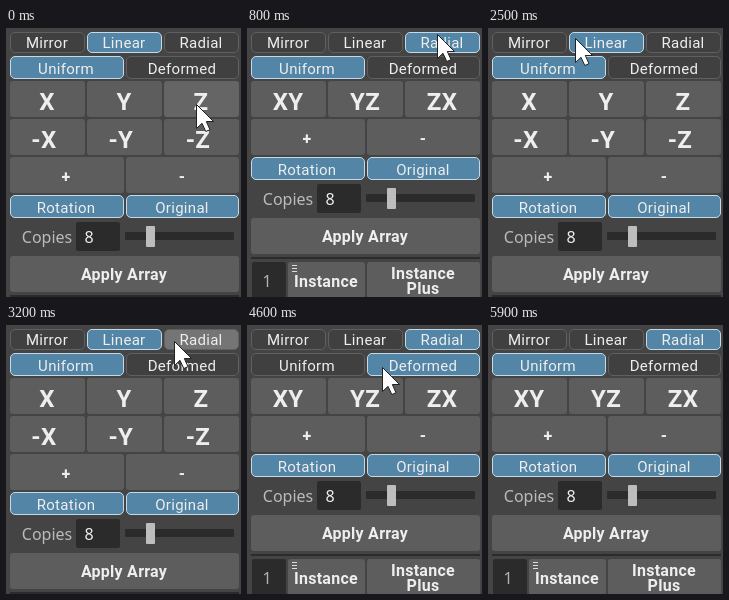
Recreate the animation shown at these times as an HTML page. Size 235 by 269 pixels, loop 6.4 s.

```html
<!DOCTYPE html>
<html>
<head>
<meta charset="utf-8">
<style>
html, body { margin: 0; width: 100%; height: 100%; overflow: hidden; background: #444; }
svg { display: block; }
text { font: 15px Roboto, sans-serif; letter-spacing: .3px; text-anchor: middle; fill: #eee; }
.bold { font-weight: 700; font-size: 16px; letter-spacing: .25px; }
.big { font-weight: 700; font-size: 24px; }
.label, .value { font: 16px "Noto Sans", sans-serif; letter-spacing: 0; }
.label { fill: #bbb; }
.dim { fill: #aab4bc; }
</style>
</head>
<body>
<svg id="stage" width="235" height="269" viewBox="0 0 235 269"></svg>
<script>
const stage = document.getElementById('stage');
const LOOP = 6400, STEP = 100;

// Pointer moves: start, end, target x, y
const moves = [
  [0, 300, 190, 2], [500, 800, 190, 6], [1300, 1900, 140, 9], [2200, 2700, 74, 10],
  [3000, 3300, 182, 17], [3800, 4000, 152, 20], [4000, 4300, 135, 42],
  [4700, 5400, 86, 47], [5400, 5900, 105, 275]
];
const easeOut = k => Math.sin(k * Math.PI / 2);

function pointer(t) {
  let x = 190, y = 76;
  for (const [start, end, toX, toY] of moves) {
    const k = easeOut(Math.min(1, Math.max(0, (t - start) / (end - start))));
    x += (toX - x) * k;
    y += (toY - y) * k;
  }
  return [Math.round(x), Math.round(y)];
}

const rect = (x, y, w, h, fill, r = 0) =>
  `<rect x="${x}" y="${y}" width="${w}" height="${h}" rx="${r}" fill="${fill}"/>`;
const text = (s, x, y, cls = '') => `<text x="${x}" y="${y}" class="${cls}">${s}</text>`;
const middle = (x, w) => Math.floor(x + (w - 1) / 2);
const inside = ([px, py], x, y, w, h) => px > x && px < x + w && py >= y && py < y + h;

const button = (s, x, y, w, cls, base, fill = '#5d5d5d') =>
  rect(x, y, w, 36, fill, 3) + text(s, middle(x, w), y + base, cls);

function toggle(s, x, y, w, h, on, tip) {
  const fill = on ? '#5285a6' : inside(tip, x, y, w, h) ? '#757575' : '#404040';
  return `<rect x="${x + .5}" y="${y + .5}" width="${w - 1}" height="${h - 1}" rx="4.5"
    fill="${fill}" stroke="${on ? '#c5d9e6' : '#606060'}"/>` +
    text(s, middle(x, w), y + h - 5);
}

// Place labels in three or two columns
const thirds = (names, make) => names.map((s, i) => make(s, 4 + 77 * i, 75, i)).join('');
const halves = (names, make) => names.map((s, i) => make(s, 4 + 116 * i, 114 - i, i)).join('');

function draw(t) {
  const tip = pointer(t);
  const linear = t < 500 || (t >= 2100 && t < 3500);
  const deformed = t >= 4500 && t < 5300;
  const pair = (names, y, on) => halves(names, (s, x, w, i) => toggle(s, x, y, w, 23, on[i], tip));
  const axes = (names, y) => thirds(names, (s, x, w) =>
    button(s, x, y, w, 'big', 29, inside(tip, x, y, w, 36) ? '#656565' : '#5d5d5d'));

  let out = thirds(['Mirror', 'Linear', 'Radial'], (s, x, w, i) =>
    toggle(s, x, 4, w, 21, i === (linear ? 1 : 2), tip));
  out += pair(['Uniform', 'Deformed'], 28, [!deformed, deformed]);
  out += axes(linear ? ['X', 'Y', 'Z'] : ['XY', 'YZ', 'ZX'], 53);
  if (linear) out += axes(['-X&#160;', '-Y&#160;', '-Z&#160;'], 91);

  const lower = halves(['+', '-'], (s, x, w) => button(s, x, 91, w, 'bold', 25)) +
    pair(['Rotation', 'Original'], 129, [true, true]) +
    text('Copies', 41, 177, 'label') +
    rect(70, 156, 44, 29, '#2b2b2b', 2) + text('8', 83, 177, 'value') +
    rect(119, 166, 109, 8, '#2b2b2b', 1) + rect(140, 160, 9, 21, '#bdbdbd', 1) +
    button('Apply Array', 4, 190, 229, 'bold', 24) +
    rect(4, 229, 229, 2, '#2b2b2b') +
    rect(5, 234, 34, 36, '#2b2b2b', 2) + text('1', 20, 259, 'value dim') +
    button('Instance', 41, 234, 77, 'bold', 25) +
    [237, 240, 243].map(y => rect(45, y, 5, 1, '#ddd')).join('') +
    button('Instance', 120, 234, 113, 'bold', 17) + text('Plus', 176, 266, 'bold');
  out += `<g transform="translate(0 ${linear ? 38 : 0})">${lower}</g>`;

  out += `<path transform="translate(${tip})" fill="#fff" stroke="#222"
    d="M.5 .5V24.5L6 19.3L9.8 27.5L14 25.7L10.3 17.5H17.5Z"/>`;
  stage.innerHTML = t < 5900 ? out : out.slice(0, out.lastIndexOf('<path'));
}

let last = -1;
function frame(now) {
  const t = Math.floor(now % LOOP / STEP) * STEP;
  if (t !== last) draw(last = t);
  requestAnimationFrame(frame);
}
draw(0);
requestAnimationFrame(frame);
</script>
</body>
</html>
```
